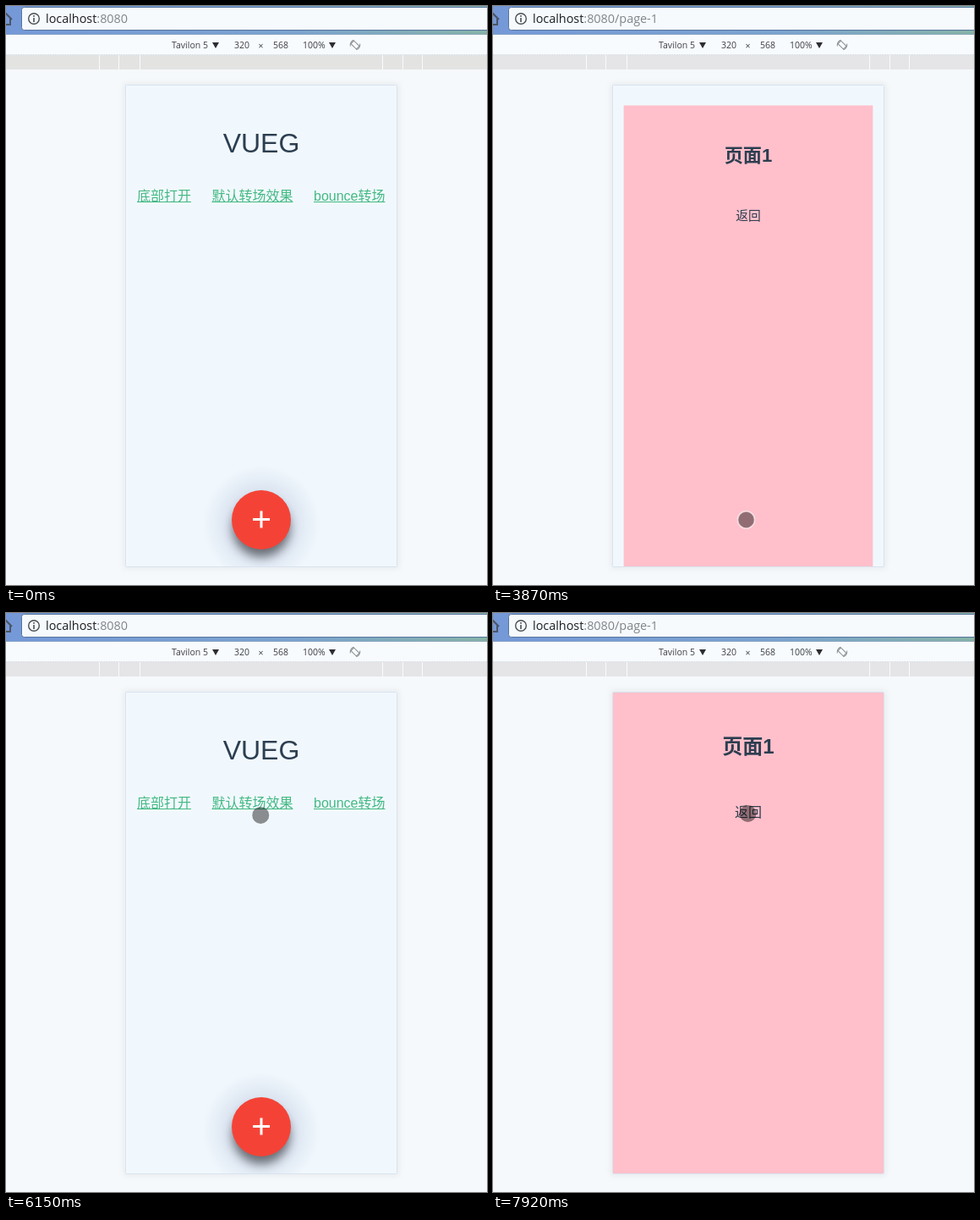
Write an HTML page that moves like this. It is 569 by 684 pixels and loops after 8 s.

```html
<!DOCTYPE html>
<html lang="zh">
<head>
<meta charset="utf-8">
<style>
  html, body { margin: 0; width: 100%; height: 100%; overflow: hidden; background: #f6f9fb; }
  svg { display: block; width: 569px; height: 684px; }
  text { white-space: pre; }
  .bar { font-family: "Open Sans", "Noto Sans", sans-serif; }
  .page { font: 16px "Liberation Sans", "Noto Sans CJK SC", "Noto Sans CJK", sans-serif; fill: #2c3e50; text-anchor: middle; }
  .links { fill: #42b983; text-anchor: start; }
</style>
</head>
<body>
<svg viewBox="0 0 569 684">
  <defs>
    <linearGradient id="sky">
      <stop offset="0" stop-color="#7599d8"/>
      <stop offset=".6" stop-color="#7ba3cf"/>
      <stop offset="1" stop-color="#86b3a8"/>
    </linearGradient>
    <radialGradient id="halo">
      <stop offset=".4" stop-color="#8d9cc4" stop-opacity=".3"/>
      <stop offset="1" stop-color="#8d9cc4" stop-opacity="0"/>
    </radialGradient>
    <filter id="soft" x="-50%" y="-50%" width="200%" height="200%"><feGaussianBlur stdDeviation="6"/></filter>
    <filter id="glow"><feGaussianBlur stdDeviation="3"/></filter>
    <clipPath id="screen"><rect x="142" y="94" width="320" height="568"/></clipPath>
  </defs>

  <!-- address bar -->
  <rect width="569" height="34" fill="url(#sky)"/>
  <path d="M-6 15L0 9L7 16M5 15V22H-2" fill="none" stroke="#4c5566" stroke-width="2"/>
  <rect x="18.5" y="1.5" width="570" height="27" rx="3" fill="#f6fafd" stroke="#56749f"/>
  <circle cx="33" cy="15" r="6.3" fill="none" stroke="#4a4d52" stroke-width="1.4"/>
  <path d="M33 11V12.7M33 14V19" stroke="#4a4d52" stroke-width="1.6"/>
  <text class="bar" x="47" y="20" font-size="14.4" fill="#1c1e22">localhost<tspan id="path" fill="#808488"></tspan></text>

  <!-- device toolbar -->
  <rect y="34" width="569" height="24" fill="#f8fbfd"/>
  <path d="M0 33.5H569" stroke="#8fa6c0" stroke-opacity=".6"/>
  <g class="bar" font-size="10.5" fill="#3c3f44">
    <text x="196" y="50">Tavilon 5</text>
    <text x="270" y="50">320</text>
    <text x="298.5" y="51">×</text>
    <text x="316" y="50">568</text>
    <text x="351" y="50">100%</text>
    <path d="M244 43h8l-4 7zM382 43h8l-4 7z" fill="#2c2e32"/>
  </g>
  <g fill="none" stroke="#85888c" transform="translate(413 46) rotate(-45)">
    <rect x="-2.5" y="-4.5" width="5" height="9" rx="1"/>
    <path d="M-5 -3A6 6 0 0 1 3 -5M5 3A6 6 0 0 1 -3 5"/>
  </g>
  <path d="M0 57.5H569" stroke="#c8d2dc" stroke-dasharray="1 1"/>
  <rect id="ruler" y="58" width="569" height="17"/>
  <path d="M110.5 58v17M133.5 58v17M158.5 58v17M445.5 58v17M469.5 58v17M492.5 58v17" stroke="#f9fbfc"/>

  <!-- phone screen -->
  <rect x="139" y="91" width="326" height="574" fill="#dfe3e6" opacity=".6" filter="url(#glow)"/>
  <rect x="141.5" y="93.5" width="321" height="569" rx="1" fill="#f1f8fd" stroke="#d9e3ef"/>
  <g id="device" clip-path="url(#screen)">
    <g id="home" class="page">
      <rect x="142" y="94" width="320" height="568" fill="#f1f8fd"/>
      <text x="302" y="173" font-size="32">VUEG</text>
      <g class="links">
        <text x="155" y="230">底部打开</text>
        <text x="243.5" y="230">默认转场效果</text>
        <text x="364" y="230">bounce转场</text>
        <path d="M155 231.5h64M243.5 231.5h96M364 231.5h84.5" stroke="#42b983"/>
      </g>
      <g id="fab">
        <circle cx="302" cy="612" r="70" fill="url(#halo)"/>
        <circle cx="302" cy="617" r="34" opacity=".5" fill="#000" filter="url(#soft)"/>
        <circle cx="302" cy="607" r="35" fill="#f44336"/>
        <path d="M292 606.5h20M302 596.5v20" stroke="#fff" stroke-width="3"/>
      </g>
    </g>
    <g id="sub" class="page">
      <rect x="142" y="94" width="320" height="594" fill="#ffc0cb"/>
      <text x="302" y="166" font-size="24" font-weight="bold">页面1</text>
      <text x="302" y="241">返回</text>
    </g>
  </g>

  <circle id="touch" r="10" fill="#000" fill-opacity=".43" stroke="#fff" stroke-width="1.6"/>
</svg>
<script>
const LOOP = 8000, ANIM = 300;
const ZOOM = 3630, BACK = 5272, RISE = 7012;
const [path, ruler, device, home, fab, sub, touch] =
  ['path', 'ruler', 'device', 'home', 'fab', 'sub', 'touch'].map(id => document.getElementById(id));

const clamp = v => Math.min(1, Math.max(0, v));
const span = (t, a, b) => clamp((t - a) / (b - a));
const smooth = u => u * u * (3 - 2 * u);

function bezier(x1, y1, x2, y2) {
  const at = (a, b, s) => 3 * a * s * (1 - s) ** 2 + 3 * b * s * s * (1 - s) + s ** 3;
  return u => {
    let lo = 0, hi = 1;
    for (let i = 0; i < 24; i++) {
      const mid = (lo + hi) / 2;
      if (at(x1, x2, mid) < u) lo = mid; else hi = mid;
    }
    return at(y1, y2, hi);
  };
}
const ease = bezier(.25, .1, .25, 1);
const easeInOut = bezier(.42, 0, .58, 1);

// begin, end, x, y, sideways bend, easing
const moves = [
  [1140, 1740, 212, 175, 0, u => u ** 1.9],
  [2000, 2800, 311, 587, -52, smooth],
  [2800, 3150, 299.5, 607, 0, smooth],
  [4300, 4950, 302, 239, 13, smooth],
  [6130, 6570, 188.5, 229, 0, smooth],
  [7540, 7920, 301.5, 237, 0, smooth]
];

function touchAt(t) {
  let x = 399, y = 96;
  for (const [a, b, tx, ty, bend, curve] of moves) {
    if (t < a) break;
    const p = curve(span(t, a, b));
    x += (tx - x) * p + bend * 4 * p * (1 - p);
    y += (ty - y) * p;
  }
  return [x, y];
}

function place(el, transform, opacity = 1) {
  el.setAttribute('transform', transform);
  el.setAttribute('opacity', opacity);
}

function draw(t) {
  const onSub = t >= ZOOM && t < BACK || t >= RISE;
  path.textContent = ':8080' + (onSub ? '/page-1' : '');

  const k = span(t, 330, 1110);
  ruler.setAttribute('fill', `rgb(${227 + 2 * k},${227 + k},${226 + 4 * k})`);

  const front = onSub ? sub : home;
  if (device.lastElementChild !== front) device.append(front);
  place(home, '');
  place(sub, '');
  if (t >= RISE) {
    const p = ease(span(t, RISE, RISE + ANIM));
    place(sub, `translate(0 ${594 * (1 - p)})`, p);
  } else if (t >= BACK) {
    const p = ease(span(t, BACK, BACK + ANIM));
    place(home, `translate(${-320 * (1 - p)} 0)`, p);
  } else if (t >= ZOOM) {
    const s = easeInOut(span(t, ZOOM, ZOOM + ANIM));
    place(sub, `translate(302 391) scale(${s}) translate(-302 -391)`);
  }
  fab.setAttribute('visibility', t >= BACK && t < BACK + ANIM ? 'hidden' : 'visible');

  const [x, y] = touchAt(t);
  touch.setAttribute('cx', x);
  touch.setAttribute('cy', y);
  touch.setAttribute('visibility', t < 1110 ? 'hidden' : 'visible');
  touch.setAttribute('stroke-opacity', t < BACK ? .6 : 0);
}

const start = performance.now();
function tick() {
  draw((performance.now() - start) % LOOP);
  requestAnimationFrame(tick);
}
tick();
</script>
</body>
</html>
```
